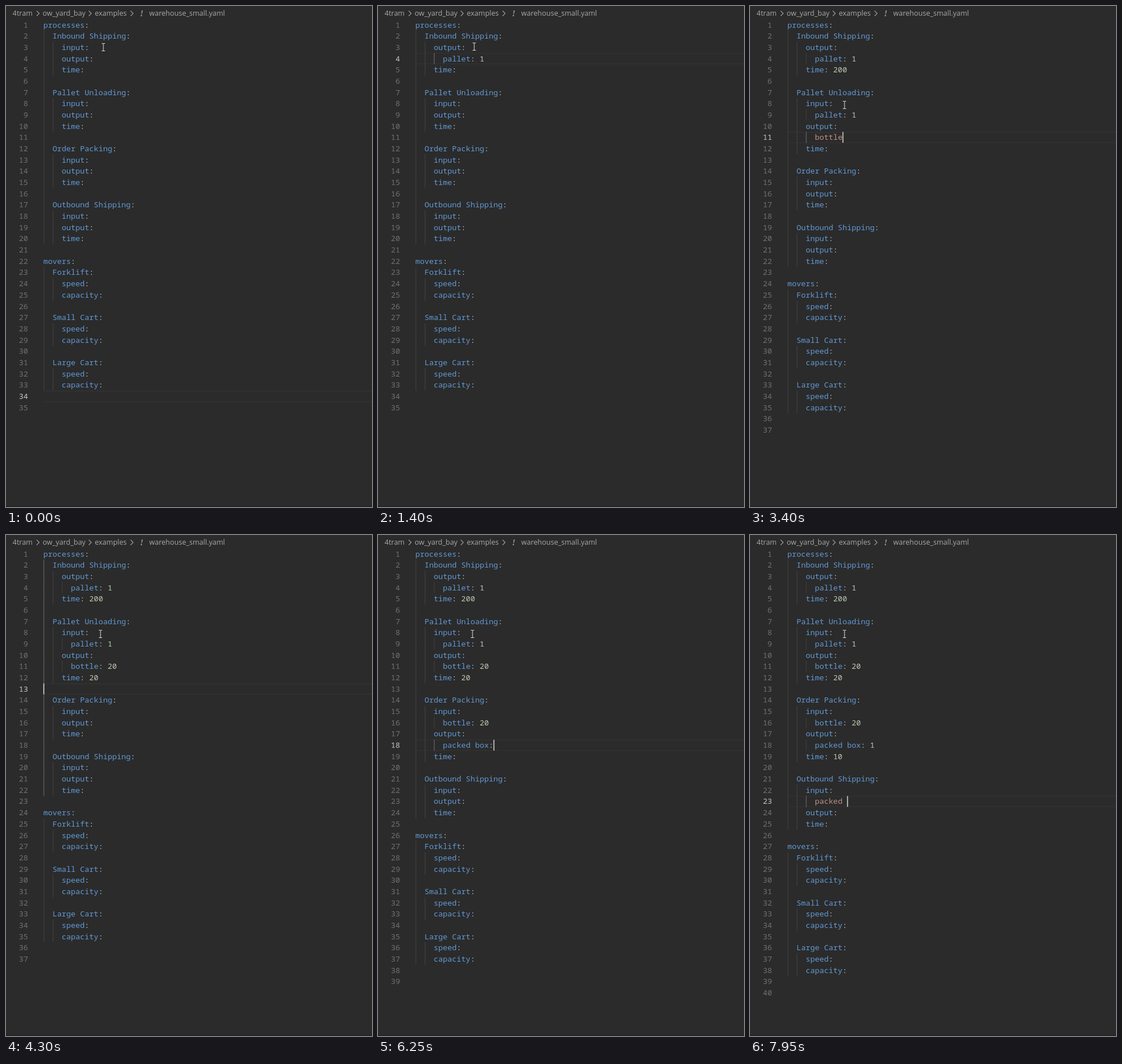
Animation, 639 px wide and 876 px high, one loop 8 s. Source, as an HTML page:

```html
<!DOCTYPE html>
<html lang="en">
<head>
<meta charset="utf-8">
<title>YAML editor</title>
<style>
  html, body { margin: 0; width: 100%; height: 100%; overflow: hidden; background: #2b2b2b; }
  svg { display: block; width: 639px; height: 876px; }
  text { white-space: pre; }
  #code { font: 13.37px "Noto Sans Mono", monospace; }
  #path { font: 12.5px "Open Sans", sans-serif; fill: #a8a8a8; }
  .key { fill: #6299d4; }
  .sep { fill: #bfc3c6; }
  .num { fill: #bccab3; }
  .str { fill: #bf9185; }
  .no { fill: #6e7177; text-anchor: end; }
  .no.on { fill: #c6c6c6; }
</style>
</head>
<body>
<svg viewBox="0 0 639 876">
  <rect width="639" height="876" fill="#2b2b2b"/>
  <rect y="874" width="639" height="2" fill="#232323"/>
  <g id="path">
    <text x="11.5" y="17.3">4tram</text>
    <text x="64" y="17.3">ow_yard_bay</text>
    <text x="155" y="17.3">examples</text>
    <text x="250" y="17.3">warehouse_small.yaml</text>
    <path d="M53.5 8.5l4.5 4.5-4.5 4.5M144.5 8.5l4.5 4.5-4.5 4.5M217.5 8.5l4.5 4.5-4.5 4.5" fill="none" stroke="#a0a0a0" stroke-width="1.1"/>
    <text x="234" y="17.5" fill="#a398bd" style="font:italic bold 15px 'Liberation Serif',serif">!</text>
  </g>
  <g id="code"></g>
  <path id="mouse" d="M-3 -6.5H-1Q0 -6.5 0 -5.5Q0 -6.5 1 -6.5H3M0 -5.5V5.5M-3 6.5H-1Q0 6.5 0 5.5Q0 6.5 1 6.5H3" fill="none" stroke="#d2d2d2" stroke-width="1.1"/>
</svg>
<script>
const LOOP = 8000, BLINK = 250;
const X0 = 65.2, CHAR = 8.02, Y0 = 33, ROW = 19.68;

const block = (name, keys) => [`  ${name}:`, ...keys.map(k => `    ${k}:`), ''];
const processes = ['Inbound Shipping', 'Pallet Unloading', 'Order Packing', 'Outbound Shipping'];
const movers = ['Forklift', 'Small Cart', 'Large Cart'];
const START = [
  'processes:', ...processes.flatMap(n => block(n, ['input', 'output', 'time'])),
  'movers:', ...movers.flatMap(n => block(n, ['speed', 'capacity'])), ''
];

// Input log: '<' backspace, '>' enter, 'v' arrow down, a number clicks the end of that line.
const events = [];
function input(at, step, keys) {
  for (const key of typeof keys === 'number' ? [keys] : keys) {
    events.push({ at, key });
    at += step;
  }
}
input(100, 0, 3);
input(300, 25, '<<<<<<<<');
input(540, 0, '<');
input(680, 0, 3);
input(730, 0, '>');
input(780, 42, 'pallet: 1');
input(1600, 0, 5);
input(1650, 65, ' 200');
input(2140, 0, 8);
input(2240, 0, '>');
input(2300, 55, 'pallet: 1');
input(2840, 0, 'v');
input(2940, 0, '>');
input(3040, 64, 'bottle');
input(3445, 80, ': 20');
input(3850, 0, 'v');
input(3945, 95, ' 20');
input(4250, 100, 'vvv');
input(4600, 0, '>');
input(4850, 0, 'b');
input(4995, 58, 'ottle: 20');
input(5590, 0, 'v');
input(5690, 0, '>');
input(5750, 48, 'packed box:');
input(6345, 100, ' 1');
input(6590, 0, 'v');
input(6690, 90, ' 10');
input(7000, 95, 'vvv');
input(7345, 0, '>');
input(7445, 75, 'packed ');

const indentOf = s => s.search(/\S|$/);

function apply(ed, key) {
  const { lines } = ed, s = lines[ed.row];
  if (typeof key === 'number') {
    ed.row = key - 1;
    ed.col = lines[ed.row].length;
  } else if (key === 'v') {
    ed.row++;
    ed.col = Math.min(ed.goal, lines[ed.row].length);
    return;
  } else if (key === '>') {
    const indent = indentOf(s) + (s.endsWith(':') ? 2 : 0);
    lines.splice(++ed.row, 0, ' '.repeat(indent));
    ed.col = indent;
  } else if (key === '<' && ed.col === 0) {
    lines.splice(ed.row--, 1);
    ed.col = lines[ed.row].length;
  } else if (key === '<') {
    const n = s.trim() ? 1 : 2; // a bare indent goes one level at a time
    lines[ed.row] = s.slice(0, ed.col - n) + s.slice(ed.col);
    ed.col -= n;
  } else {
    lines[ed.row] = s.slice(0, ed.col) + key + s.slice(ed.col);
    ed.col++;
  }
  ed.goal = ed.col;
}

function stateAt(t) {
  const ed = { lines: [...START], row: 33, col: 0, goal: 0, last: -300 };
  for (const e of events) {
    if (e.at > t) break;
    apply(ed, e.key);
    ed.last = e.at;
  }
  return ed;
}

// Number of indent guides per line; blank lines take theirs from the neighbours.
function guideDepths(lines) {
  const near = (i, d) => {
    while (lines[i] !== undefined && !lines[i].trim()) i += d;
    return lines[i] === undefined ? 0 : indentOf(lines[i]);
  };
  return lines.map((s, i) => {
    if (s.trim()) return indentOf(s) / 2;
    const above = near(i, -1), below = near(i, 1);
    return above < below ? 1 + above / 2 : below / 2;
  });
}

const rect = (x, y, w, h, fill) => `<rect x="${x}" y="${y}" width="${w}" height="${h}" fill="${fill}"/>`;
const span = (cls, s) => s ? `<tspan class="${cls}">${s}</tspan>` : '';

function paint(s) {
  const body = s.trim(), cut = body.indexOf(':');
  return cut < 0 ? span('str', body)
    : span('key', body.slice(0, cut)) + span('sep', ':') + span('num', body.slice(cut + 1));
}

function drawCode({ lines, row, col }, caret) {
  const depth = guideDepths(lines);
  const active = Math.max(depth[row], depth[row + 1] || 0);
  let from = depth[row] < active ? row + 1 : row, to = from;
  while (depth[from - 1] >= active) from--;
  while (depth[to + 1] >= active) to++;

  const rowTop = Y0 + row * ROW - ROW / 2;
  let out = rect(66, rowTop, 573, 1.4, '#323232') + rect(66, rowTop + ROW - 1.4, 573, 1.4, '#323232');
  lines.forEach((s, i) => {
    const y = Y0 + i * ROW, base = (y + 4.5).toFixed(2);
    for (let g = 1; g <= depth[i]; g++) {
      const lit = g === active && i >= from && i <= to;
      out += rect(X0 + .4 + (g - 1) * 2 * CHAR, y - ROW / 2, 1, ROW, lit ? '#707070' : '#434343');
    }
    out += `<text class="no${i === row ? ' on' : ''}" x="38.6" y="${base}">${i + 1}</text>`;
    if (s.trim()) out += `<text x="${X0 + indentOf(s) * CHAR}" y="${base}">${paint(s)}</text>`;
  });
  if (caret) out += rect(X0 + col * CHAR, rowTop + .3, 1.7, ROW - .8, '#c8c8c8');
  return out;
}

const mousePath = [
  [0, 170, 72], [150, 170, 72], [450, 179, 81], [520, 179, 81], [660, 168, 71],
  [1420, 168, 71], [1570, 165, 112], [1880, 165, 112], [2100, 165, 173], [LOOP, 165, 173]
];
function mouseAt(t) {
  const i = mousePath.findIndex(p => p[0] > t);
  const [t0, x0, y0] = mousePath[i - 1], [t1, x1, y1] = mousePath[i];
  const u = (t - t0) / (t1 - t0), k = u * u * (3 - 2 * u);
  return [x0 + (x1 - x0) * k, y0 + (y1 - y0) * k];
}

const code = document.getElementById('code');
const mouse = document.getElementById('mouse');
let shown = '';

function render(t) {
  const ed = stateAt(t);
  const caret = Math.floor((t - ed.last) / BLINK) % 2 === 0;
  const html = drawCode(ed, caret);
  if (html !== shown) code.innerHTML = shown = html;
  mouse.setAttribute('transform', `translate(${mouseAt(t)})`);
}

function tick() {
  render(performance.now() % LOOP);
  requestAnimationFrame(tick);
}
tick();
</script>
</body>
</html>
```
